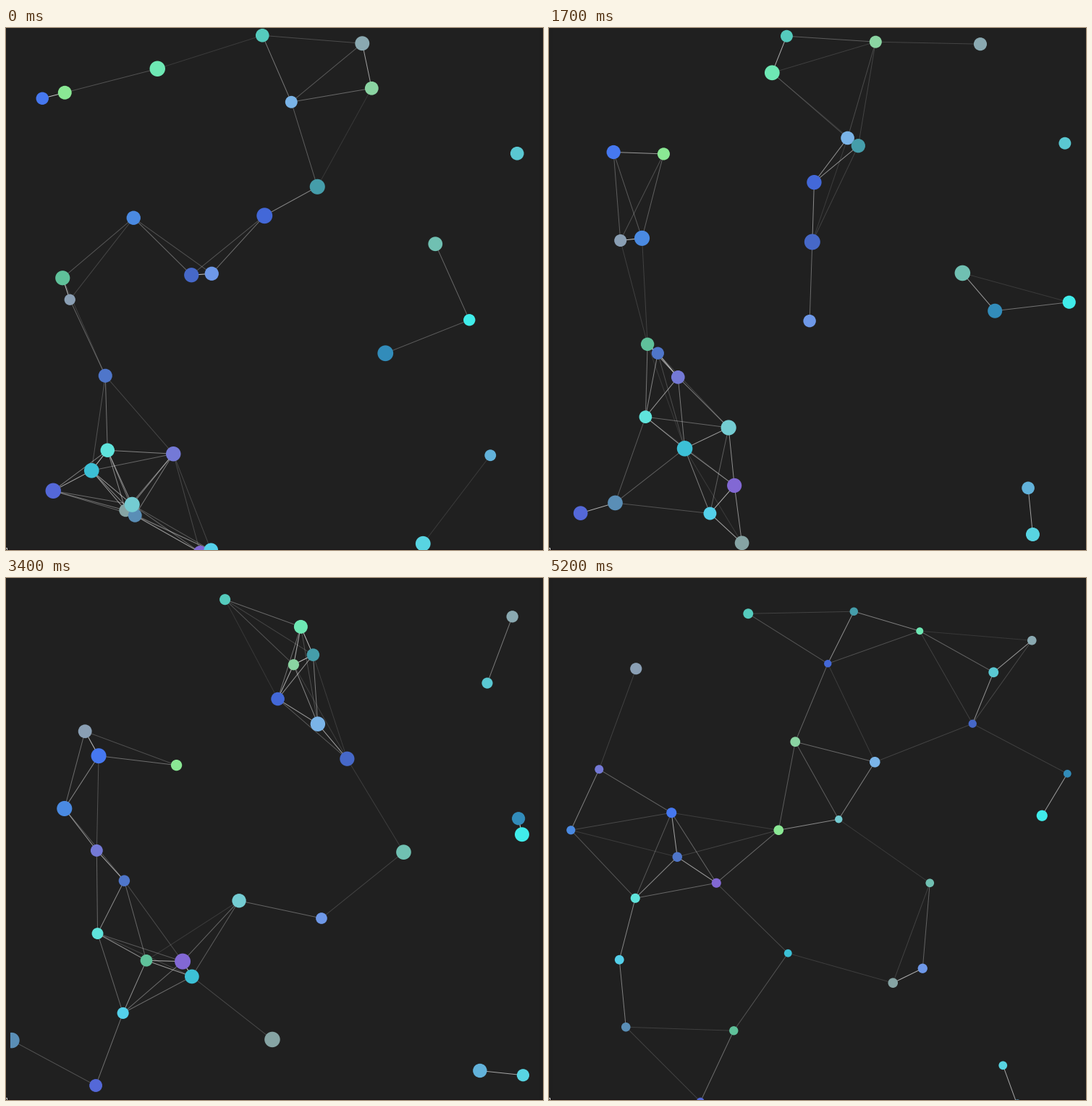
A matplotlib script that plays this animation: 742x721 px, repeating every 5.3 s.

```python
import numpy as np
import matplotlib.pyplot as plt
from matplotlib.animation import FuncAnimation
from matplotlib.collections import LineCollection
from matplotlib.patches import Rectangle

W, H, DPI = 742, 721, 100
FRAMES, STEP = 53, 100
T_END = (FRAMES - 1) * STEP / 1000
PX = 72 / DPI            # one pixel in points
REACH = 156.5            # longest link in pixels
R_MIN, R_MAX = 5, 11
PULSE = 0.2985           # radius cycles per frame

# wall: (axis it stops, coordinate)
WALLS = dict(left=(0, 6), right=(0, 736), top=(1, 0), bottom=(1, 728))

# colour, start, end, {wall: second of the bounce}; from latest pulse to earliest
DOTS = [
    ("#8a9fb4", (88, 375), (120, 125), {}),
    ("#62b2da", (669, 590), (647, 728), {}),
    ("#40ecea", (640, 403), (681, 328), dict(right=2.08)),
    ("#7ab4e8", (394, 102), (450, 254), {}),
    ("#4678f0", (50, 97), (169, 324), {}),
    ("#86a4a4", (165, 666), (475, 559), dict(bottom=1.31)),
    ("#8268d4", (268, 724), (231, 421), dict(bottom=.1)),
    ("#5a8eb6", (178, 673), (106, 620), dict(left=3.37)),
    ("#4a8ae2", (176, 262), (30, 348), {}),
    ("#70c0b2", (593, 298), (526, 421), {}),
    ("#4668c8", (256, 341), (585, 201), {}),
    ("#3cc0d6", (118, 611), (330, 518), {}),
    ("#74ccd2", (174, 658), (400, 333), {}),
    ("#6ee8b4", (209, 56), (512, 73), {}),
    ("#4368d8", (357, 259), (385, 118), {}),
    ("#328cba", (524, 449), (716, 270), dict(right=3.92)),
    ("#5468d8", (65, 639), (209, 723), dict(left=.91, bottom=4.9)),
    ("#459daa", (430, 219), (421, 46), {}),
    ("#58d4e2", (576, 712), (627, 673), dict(right=2.95)),
    ("#7479d6", (231, 588), (69, 264), {}),
    ("#5fc19a", (78, 345), (255, 625), {}),
    ("#8aa9b1", (492, 21), (667, 86), dict(top=.5, right=4)),
    ("#54d0ea", (283, 721), (97, 527), dict(bottom=.29)),
    ("#5fe4dc", (140, 583), (119, 442), {}),
    ("#6e98e8", (284, 339), (516, 539), {}),
    ("#4f76ca", (137, 480), (177, 385), {}),
    ("#8ae894", (81, 89), (317, 348), {}),
    ("#8ad4a2", (505, 83), (340, 226), dict(top=1.38)),
    ("#5ac8d2", (706, 173), (614, 130), dict(right=.87)),
    ("#55cbbd", (354, 10), (275, 49), dict(top=.69)),
]
COUNT = len(DOTS)
SHIFT = 0.42 * np.linspace(1, 0, COUNT) ** 1.6 - 0.14
FIRST, SECOND = np.triu_indices(COUNT, 1)


def coordinate(t, axis, start, end, hits):
    """Steady travel from start to end, touching each wall on this axis."""
    knots = [(0, start[axis])]
    knots += [(hit, WALLS[wall][1]) for wall, hit in hits.items()
              if WALLS[wall][0] == axis]
    knots.append((T_END, end[axis]))
    return np.interp(t, *zip(*knots))


def positions(t):
    return 0.25 + np.array([[coordinate(t, axis, *dot[1:]) for axis in (0, 1)]
                            for dot in DOTS])


def radii(frame):
    """Each dot grows and shrinks evenly between the two limits."""
    phase = (PULSE * frame - SHIFT) % 1
    return R_MIN + (R_MAX - R_MIN) * np.abs(1 - 2 * phase)


fig = plt.figure(figsize=(W / DPI, H / DPI), dpi=DPI, facecolor="#1f1f1f")
ax = fig.add_axes([0, 0, 1, 1])
ax.set_xlim(0, W)
ax.set_ylim(H, 0)
ax.axis("off")


def block(x, y, w, h, colour):
    patch = Rectangle((x, y), w, h, facecolor=colour, linewidth=0, zorder=0)
    return ax.add_patch(patch)


canvas = block(6, 0, 730, H, "#202020")
block(0, 719.5, W, 1.5, "#191415")
block(0, 718, 2, 1, "#d0d0d0")
block(1, 719, 1, 2, "#d0d0d0")

links = LineCollection([], linewidths=PX, zorder=1)
ax.add_collection(links, autolim=False)
dots = ax.scatter(np.zeros(COUNT), np.zeros(COUNT),
                  c=[dot[0] for dot in DOTS], linewidths=0, zorder=2)
for art in (links, dots):
    art.set_clip_path(canvas)


def draw(frame):
    pos = positions(frame * STEP / 1000)
    dots.set_offsets(pos)
    dots.set_sizes((2 * radii(frame) * PX) ** 2)

    # nearer pairs get brighter links
    dist = np.hypot(*(pos[FIRST] - pos[SECOND]).T)
    near = dist < REACH
    rgba = np.ones((near.sum(), 4))
    rgba[:, 3] = 0.1 + 0.8 * (1 - dist[near] / REACH)
    links.set_segments(np.stack([pos[FIRST[near]], pos[SECOND[near]]], axis=1))
    links.set_color(rgba)
    return links, dots


anim = FuncAnimation(fig, draw, frames=FRAMES, interval=STEP,
                     init_func=lambda: draw(0), repeat=True, repeat_delay=0)
plt.show()
```
